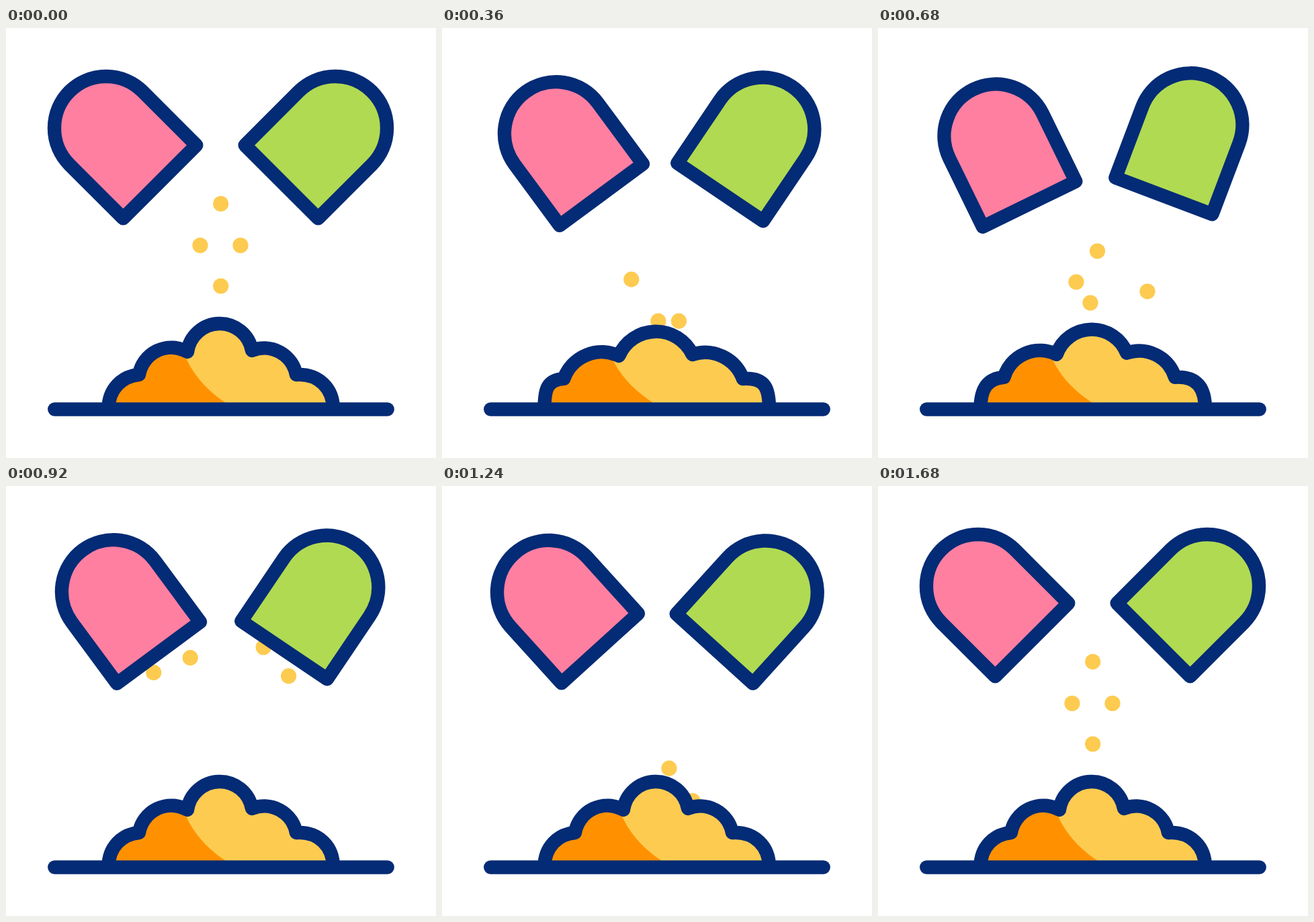
An HTML page for the animation above (2000 ms loop, 640 by 640 pixels).

```html
<!DOCTYPE html>
<html lang="en">
<head>
<meta charset="utf-8">
<title>Capsule powder</title>
<style>
  html, body { margin: 0; width: 100%; height: 100%; overflow: hidden; background: #fff; }
  svg { display: block; width: 100vw; height: 100vh; }
  .line { stroke: #042b75; stroke-width: 20.4; stroke-linejoin: round; stroke-linecap: round; }
</style>
</head>
<body>
<svg viewBox="0 0 640 640">
  <g id="dots" fill="#fdcb50"></g>
  <path id="pink" class="line" fill="#ff7fa1"/>
  <path id="green" class="line" fill="#b0da52"/>
  <path id="heap" fill="#fdcb50"/>
  <path id="shade" fill="#ff9100"/>
  <path id="rim" class="line" fill="none" style="stroke-linecap:butt"/>
  <path class="line" d="M72.3 567.5H567.7"/>
</svg>
<script>
const LOOP = 2000, STEP = 40, START = 40, REST = 1680;
const $ = id => document.getElementById(id);
const clamp = v => Math.max(0, Math.min(1, v));

// Bumps that rise to 1 at the middle and vanish at mid ± span.
const soft = (t, mid, span) => Math.cos(clamp(Math.abs(t - mid) / span) * Math.PI / 2) ** 2;
const swing = (t, mid, span) => clamp(1 - Math.abs(t - mid) / span) ** 1.42;

// slide (inward) and drop: amounts for the whole shake, the big swing and the small swing.
const capsules = [
  { id: "pink", home: 202, side: -1, tilt: 20.9, sway: 5, kick: 0,
    slide: [7.5, 0, -2.6], drop: [7, 20.9, 11.5] },
  { id: "green", home: 437, side: 1, tilt: 26.8, sway: 0, kick: 1,
    slide: [4.5, -7, 3], drop: [9.3, 3.5, 7] }
];

for (const { id } of capsules) {
  $(id).setAttribute("d", "M-77 38V-75A77 77 0 0 1 77 -75V38Z");
}

function drawCapsule(c, t) {
  const shake = Math.sin(clamp(Math.min(t - START, REST - t) / 240) * Math.PI / 2);
  const big = swing(t, 640, 600), small = soft(t, 1400, 280);
  const kick = c.kick * soft(t, 560, 80);
  const blend = ([a, b, d]) => a * shake + b * big + d * small;
  const sway = c.sway * shake * Math.cos(2 * Math.PI * (t - 360) / 1130);
  const x = c.home - c.side * (blend(c.slide) + sway - 37 * kick);
  const y = 202 + blend(c.drop) - 23 * kick;
  const angle = c.side * (45 - c.tilt * big - 7.2 * small);
  $(c.id).setAttribute("transform", `translate(${x} ${y}) rotate(${angle})`);
}

// Grains leave the capsules, pass one spot each and drop behind the heap.
const seeds = [[205, 238], [262, 197], [394, 204], [432, 244]];
const drift = [33, 0, -38, 3.5];
const bursts = [
  { start: 480, arrive: 680, leave: 680, speed: 0.8,
    spots: [[295, 378], [316, 409], [326.5, 332], [401, 392]] },
  { start: 840, arrive: 1080, leave: 1080, speed: 0.5,
    spots: [[281.5, 357], [325.5, 373], [338, 312], [373, 360.5]] },
  { start: 1320, arrive: REST, leave: LOOP + START, speed: 0, settle: true,
    spots: [[289, 323.5], [319.7, 384], [319.7, 261.5], [349, 323.5]] }
];

const grains = seeds.map(() => {
  const el = document.createElementNS("http://www.w3.org/2000/svg", "circle");
  el.setAttribute("r", 11.6);
  $("dots").append(el);
  return el;
});

function drawGrains(t) {
  if (t < bursts[0].start) t += LOOP;
  const b = bursts.filter(burst => t >= burst.start).pop();
  const part = clamp((t - b.start) / (b.arrive - b.start));
  const p = b.settle ? 1 - (1 - part) ** 2 : part;
  const late = Math.max(0, t - b.leave);
  const fall = b.speed * late + 0.0011 * late * late;
  grains.forEach((el, i) => {
    const [x0, y0] = seeds[i], [x1, y1] = b.spots[i];
    const aside = b.settle ? drift[i] * fall / 113 : 0;
    el.setAttribute("cx", x0 + (x1 - x0) * p ** 1.5 + aside);
    el.setAttribute("cy", Math.min(520, y0 + (y1 - y0) * p + fall));
  });
}

// Squashing pushes the notches of the heap outward and down, and flattens its bumps.
function drawHeap(t) {
  const k = 1.25 * soft(t, 480, 400);
  const notch = (dx, y) => [318 + dx * (1 + 0.14 * k), y + 6 * k];
  const [a, b, c, d] = [notch(-120, 516), notch(-48, 482), notch(48, 480), notch(114, 516)];
  const r = 48.6 + 11.5 * k;
  const arc = p => `A${r} ${r} 0 0 1 ${p}`;
  const left = `M152.5 567C152.5 537 ${a[0] - 25} ${a[1] + 2} ${a}` + arc(b);
  const right = arc(c) + arc(d) + `C${d[0] + 34} ${d[1] - 2} 487 537 487 567`;
  const move = -12.5 * k;
  $("heap").setAttribute("d", left + right + "Z");
  $("rim").setAttribute("d", left + right);
  $("shade").setAttribute("d",
    left + `L${264 + move} ${b[1]}Q${284 + move} 535 ${342 + move} 567Z`);
}

function render(t) {
  for (const c of capsules) drawCapsule(c, t);
  drawGrains(t);
  drawHeap(t);
}

let start;
function tick(now) {
  if (start === undefined) start = now;
  const t = (now - start) % LOOP;
  render(Math.floor(t / STEP) * STEP);
  requestAnimationFrame(tick);
}
render(0);
requestAnimationFrame(tick);
</script>
</body>
</html>
```
